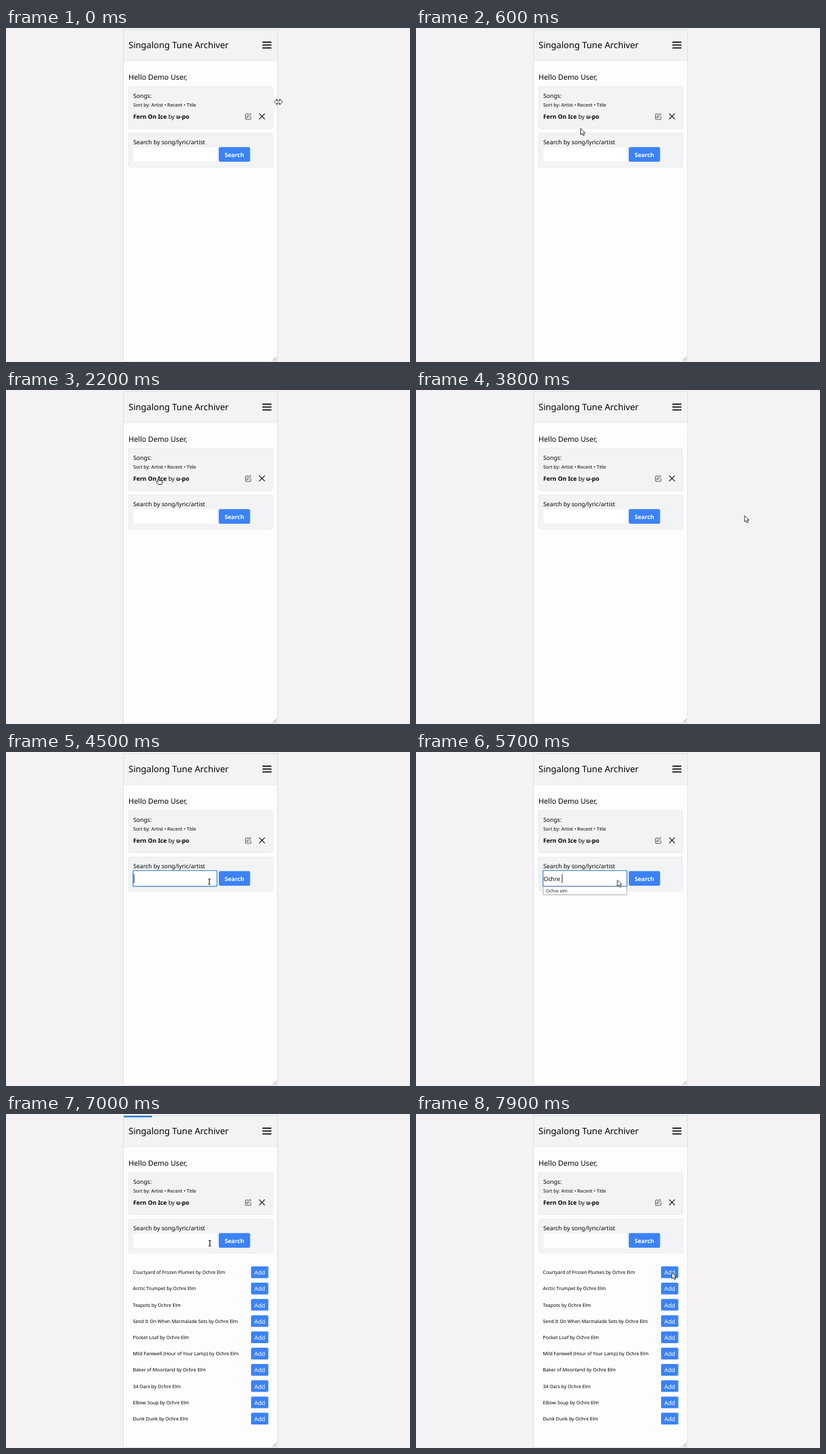
Animation of 600x497 px, one loop 8 s. Source, as an HTML page:

```html
<!DOCTYPE html>
<html lang="en">
<head>
<meta charset="utf-8">
<title>Song list</title>
<style>
  html, body { margin: 0; width: 100%; height: 100%; overflow: hidden; background: #f4f2f4; }
  svg { display: block; width: 600px; height: 497px; }
  text { font-family: "Noto Sans", "Open Sans", sans-serif; font-size: 8.7px; fill: #000;
         white-space: pre; text-rendering: geometricPrecision; }
  .small { font-size: 7px; }
  .bold { font-weight: 700; }
  .on-blue { fill: #fff; }
  .card { fill: #f1f3f5; stroke: #e5e7eb; stroke-width: .8; }
  .blue { fill: #3b82f6; }
  .icon { fill: none; stroke: #111; stroke-linecap: round; stroke-linejoin: round; }
  .cursor path { fill: #fff; stroke: #222; stroke-width: .9; stroke-linejoin: round; }
</style>
</head>
<body>
<svg viewBox="0 0 600 497">
  <defs>
    <linearGradient id="shade" x2="0" y2="1">
      <stop stop-color="#000" stop-opacity=".07"/>
      <stop offset="1" stop-color="#000" stop-opacity="0"/>
    </linearGradient>
  </defs>
  <rect width="600" height="497" fill="#f4f2f4"/>
  <rect x="174.5" y="2.5" width="229" height="494" fill="#fdfdff" stroke="#e0dfe2"/>
  <rect x="175" y="3" width="228" height="44.5" fill="#f1f3f5"/>
  <rect x="175" y="47.5" width="228" height="3" fill="url(#shade)"/>
  <rect id="bar" x="175" y="2.6" height="2.4" fill="#2f7fd6"/>
  <text x="182" y="30" style="font-size:13.05px">Singalong Tune Archiver</text>
  <path class="icon" d="M381.5 21.1h12M381.5 25.4h12M381.5 29.7h12" stroke-width="1.7"/>
  <text x="182" y="76.8" style="font-size:10.8px">Hello Demo User,</text>

  <rect class="card" x="182" y="87" width="214" height="62.5" rx="2"/>
  <text x="189" y="104.2">Songs:</text>
  <text class="small" x="189" y="117.2">Sort by: Artist • Recent • Title</text>
  <text x="189" y="135"><tspan class="bold">Fern On Ice</tspan> by <tspan class="bold">u-po</tspan></text>
  <path class="icon" d="M359.5 128h-3q-.8 0-.8.8v6.4q0 .8.8.8h6.4q.8 0 .8-.8v-3M362.6 127.2l1.4 1.4-4.3 4.3-2 .6.6-2z" stroke-width=".7"/>
  <path class="icon" d="M376.3 127.6l7.8 7.8M384.1 127.6l-7.8 7.8" stroke-width="1.15"/>

  <rect class="card" x="182" y="156.5" width="214" height="50.5" rx="2"/>
  <text x="189" y="173.4" style="font-size:8.75px">Search by song/lyric/artist</text>
  <rect x="189" y="177.3" width="124.5" height="22" rx="1.5" fill="#fff" stroke="#eceef1" stroke-width=".6"/>
  <rect class="blue" x="316" y="177.3" width="46.5" height="21.8" rx="2"/>
  <text class="bold on-blue" x="339.2" y="191.5" text-anchor="middle">Search</text>
  <g id="focus">
    <rect x="188.6" y="176.5" width="124.8" height="23.4" rx=".8" fill="#fff" stroke="#3a80d4" stroke-width="1.2"/>
    <text id="typed" x="189.6" y="191.6"></text>
    <rect id="caret" y="182" width=".9" height="13" fill="#111"/>
  </g>
  <g id="menu">
    <rect x="189" y="200.3" width="124" height="12.2" fill="#fff" stroke="#a5a5aa" stroke-width=".9"/>
    <text x="193" y="208.5" style="font-size:6.6px;fill:#1c1c1c">Ochre elm</text>
  </g>
  <g id="results"></g>
  <path d="M396 495.2l6-6M399 495.2l3-3M401.4 495.2l.6-.6" stroke="#8d8d92" stroke-width=".9" fill="none"/>

  <g class="cursor" id="size"><path d="M-6 0L-2-4.3V-1.6H2V-4.3L6 0L2 4.3V1.6H-2V4.3Z"/></g>
  <g class="cursor" id="arrow"><path d="M0 0V9.2L2.2 7.3L3.8 10.7L5.5 9.9L4 6.6H6.7Z"/></g>
  <g class="cursor" id="hand"><path d="M-.8.6Q0-.6.8.6V4L5 4.8Q6 5.1 5.8 6.4L5 10H-.8L-3.2 6.4Q-3.5 5.2-2.3 5.4L-.8 6.4Z"/></g>
  <g class="cursor" id="beam">
    <path d="M-1.8-4H1.8M-1.8 4H1.8M0-4V4" style="stroke:#fff;stroke-width:2.4"/>
    <path d="M-1.8-4Q0-4 0-3.2Q0-4 1.8-4M-1.8 4Q0 4 0 3.2Q0 4 1.8 4M0-3.4V3.4" style="fill:none;stroke-width:1.2"/>
  </g>
</svg>
<script>
  const LOOP = 8000, STEP = 100;
  const $ = id => document.getElementById(id);
  const show = (id, on) => $(id).setAttribute("visibility", on ? "visible" : "hidden");

  const artist = "Ochre Elm", query = "Ochre elm";
  const songs = [
    "Courtyard of Frozen Plumes", "Arctic Trumpet", "Teapots", "Send It On When Marmalade Sets",
    "Pocket Loaf", "Mild Farewell (Hour of Your Lamp)", "Baker of Moonland", "34 Oars",
    "Elbow Soup", "Dunk Dunk"
  ];
  $("results").innerHTML = songs.map((song, i) => {
    const y = i * 24.2;
    return `<text class="small" x="188.5" y="${238.1 + y}">${song} by ${artist}</text>
      <rect class="blue" x="364" y="${226.8 + y}" width="25.6" height="17.4" rx="1.6"/>
      <text class="on-blue" x="376.8" y="${239.2 + y}" text-anchor="middle">Add</text>`;
  }).join("");

  // time, x, y, pointer shape from that time on
  const path = [
    [0, 404.5, 110, "size"], [100, 392, 118, "arrow"], [300, 325, 140, "arrow"],
    [600, 244.5, 149.5, "arrow"], [900, 216.5, 158, "arrow"], [1000, 215.5, 154, "arrow"],
    [1300, 218, 131, "hand"], [1400, 218, 131, "hand"], [1600, 226, 146, "arrow"],
    [1800, 236, 159, "arrow"], [2000, 233, 150, "arrow"], [2200, 226.5, 130.5, "hand"],
    [2300, 226.5, 130.5, "hand"], [2400, 184, 181, "arrow"], [2500, 262, 112, "arrow"],
    [2600, 368, 25, "arrow"], [2700, 368, 25, ""], [3800, 488, 187, "arrow"],
    [4000, 372, 188, "arrow"], [4200, 302, 193, "beam"], [5000, 302, 193, "beam"],
    [5100, 299, 190.5, "arrow"], [6400, 299, 190.5, "arrow"], [6500, 302.8, 192.3, "beam"],
    [7100, 302.8, 192.3, "beam"], [7300, 264, 215, "arrow"], [7500, 242, 237, "arrow"],
    [7600, 242, 237, "arrow"], [7700, 290, 240, "arrow"], [7900, 380, 236, "arrow"]
  ];
  const barWidth = [[6400, 0], [6600, 16], [6800, 28], [7000, 42], [7500, 214]];
  const barAlpha = [[7100, 1], [7600, 0]];

  function span(keys, t) {
    const i = Math.max(0, keys.findLastIndex(k => k[0] <= t));
    const a = keys[i], b = keys[i + 1] || a;
    const p = b === a ? 0 : Math.max(0, (t - a[0]) / (b[0] - a[0]));
    return { a, at: n => a[n] + (b[n] - a[n]) * p };
  }

  function draw(t) {
    const pos = span(path, t);
    for (const id of ["size", "arrow", "hand", "beam"]) {
      show(id, pos.a[3] === id);
      $(id).setAttribute("transform", `translate(${pos.at(1)} ${pos.at(2)})`);
    }

    const focused = t >= 4500 && t < 6800;
    const count = Math.max(0, Math.min(query.length, (t - 5100) / STEP));
    $("typed").textContent = query.slice(0, count);
    $("caret").setAttribute("x", 189.7 + (count ? $("typed").getComputedTextLength() : 0));
    show("focus", focused);
    show("caret", focused && (t < 4800 || t >= 5100));
    show("menu", t >= 5200 && t < 6100);
    show("results", t >= 6800);

    $("bar").setAttribute("width", span(barWidth, t).at(1));
    $("bar").setAttribute("opacity", span(barAlpha, t).at(1));
  }

  const start = performance.now();
  function tick() {
    const t = (performance.now() - start) % LOOP;
    draw(Math.floor(t / STEP) * STEP);
    requestAnimationFrame(tick);
  }
  tick();
</script>
</body>
</html>
```
